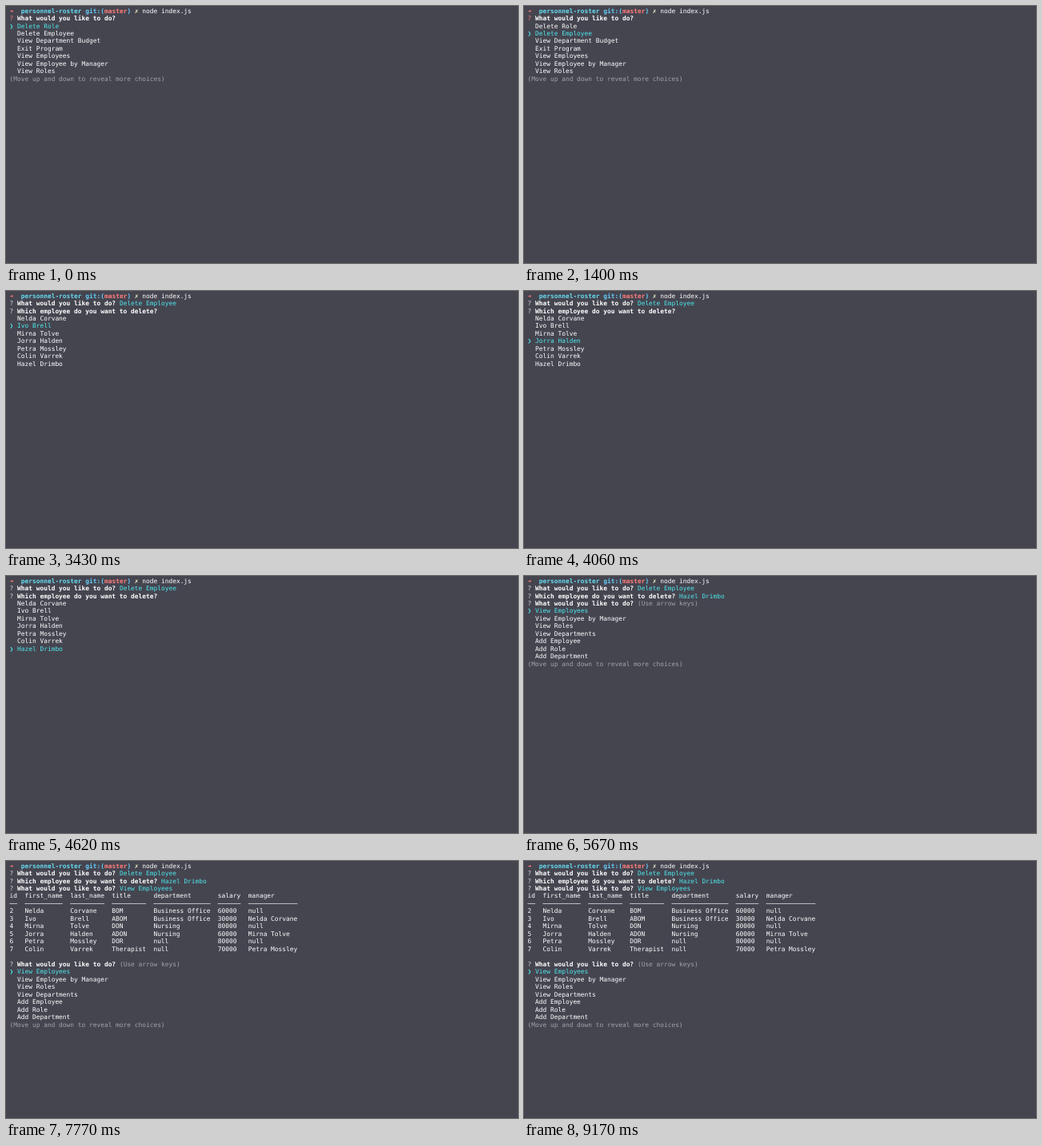
Write an HTML page with a canvas that moves like this. It is 640 px wide and 322 px high and loops after 9.59 s.

```html
<!DOCTYPE html>
<html lang="en">
<head>
<meta charset="utf-8">
<title>Terminal prompt</title>
<style>
  html, body { margin: 0; width: 100%; height: 100%; overflow: hidden; background: #454550; }
  canvas { display: block; width: 100vw; height: 100vh; }
</style>
</head>
<body>
<canvas id="term" width="640" height="322"></canvas>
<script>
const ctx = document.getElementById('term').getContext('2d');
const LOOP = 9590;
const LEFT = 4.6, BASE = 8.6, COL = 4.735, ROW = 9.474;
const FONT = `${COL / 0.60205}px "DejaVu Sans Mono", "Noto Sans Mono", monospace`;

const BG = '#454550', WHITE = '#ffffff', CYAN = '#4ee8ec', GREY = '#a2a2a6';
const RED = '#ff7c7a', DIR = '#66dcf0', BLUE = '#66ccf8', YELLOW = '#fbfad2', MARK = '#cfdcdc';

const staff = ['Nelda Corvane', 'Ivo Brell', 'Mirna Tolve', 'Jorra Halden',
  'Petra Mossley', 'Colin Varrek', 'Hazel Drimbo'];
const views = ['View Employees', 'View Employee by Manager', 'View Roles'];
const topMenu = [...views, 'View Departments', 'Add Employee', 'Add Role', 'Add Department'];
const endMenu = ['Delete Role', 'Delete Employee', 'View Department Budget', 'Exit Program', ...views];

const widths = [2, 10, 9, 9, 15, 6, 13];
const heads = ['id', 'first_name', 'last_name', 'title', 'department', 'salary', 'manager'];
const jobs = [
  ['BOM', 'Business Office', 60000, 'null'],
  ['ABOM', 'Business Office', 30000, staff[0]],
  ['DON', 'Nursing', 80000, 'null'],
  ['ADON', 'Nursing', 60000, staff[2]],
  ['DOR', 'null', 80000, 'null'],
  ['Therapist', 'null', 70000, staff[4]]
];

// Times at which the pointer steps down, and at which an answer is entered
const MENU_DOWN = 840, PICK_MENU = 1820, PICK_NAME = 5530, PICK_VIEW = 6510;
const NAME_DOWN = [3290, 3570, 3920, 4130, 4340, 4550];

// A line is a list of [text, colour, bold] parts
const plain = (text, color = WHITE) => [[text, color]];
const ask = (question, tail = '', color = CYAN, mark = MARK) =>
  [['? ', mark], [question + ' ', WHITE, true], [tail, color]];
const list = (items, active) => items.map((item, i) =>
  i === active ? [['❯ ', CYAN, true], [item, CYAN]] : plain('  ' + item));

const WHAT = 'What would you like to do?';
const WHICH = 'Which employee do you want to delete?';
const HINT = '(Use arrow keys)';
const more = plain('(Move up and down to reveal more choices)', GREY);
const shell = [['➜  ', RED, true], ['personnel-roster ', DIR, true], ['git:(', BLUE, true],
  ['master', RED, true], [') ', BLUE, true], ['✗ ', YELLOW, true], ['node index.js', WHITE]];

const tableRow = cells => plain(cells.map((c, i) => String(c).padEnd(widths[i])).join('  '));
const table = [
  tableRow(heads),
  tableRow(widths.map(w => '─'.repeat(w))),
  ...jobs.map((job, i) => tableRow([i + 2, ...staff[i].split(' '), ...job])),
  plain('')
];
const freshMenu = [ask(WHAT, HINT, GREY), ...list(topMenu, 0), more];

function screen(t) {
  if (t < PICK_MENU)
    return [shell, ask(WHAT, '', CYAN, RED), ...list(endMenu, t < MENU_DOWN ? 0 : 1), more];

  const lines = [shell, ask(WHAT, 'Delete Employee')];
  if (t < PICK_NAME) {
    const active = NAME_DOWN.filter(at => t >= at).length;
    return [...lines, ask(WHICH, active ? '' : HINT, GREY), ...list(staff, active)];
  }
  lines.push(ask(WHICH, staff[6]));
  if (t >= PICK_VIEW) lines.push(ask(WHAT, views[0]), ...table);
  return [...lines, ...freshMenu];
}

function draw(lines) {
  ctx.fillStyle = BG;
  ctx.fillRect(0, 0, 640, 322);
  ctx.textRendering = 'geometricPrecision';
  lines.forEach((parts, row) => {
    let col = 0;
    for (const [text, color, bold] of parts) {
      ctx.font = (bold ? 'bold ' : '') + FONT;
      ctx.fillStyle = color;
      ctx.fillText(text, LEFT + col * COL, BASE + row * ROW);
      col += text.length;
    }
  });
}

const start = performance.now();
function tick() {
  draw(screen((performance.now() - start) % LOOP));
  requestAnimationFrame(tick);
}
tick();
</script>
</body>
</html>
```
